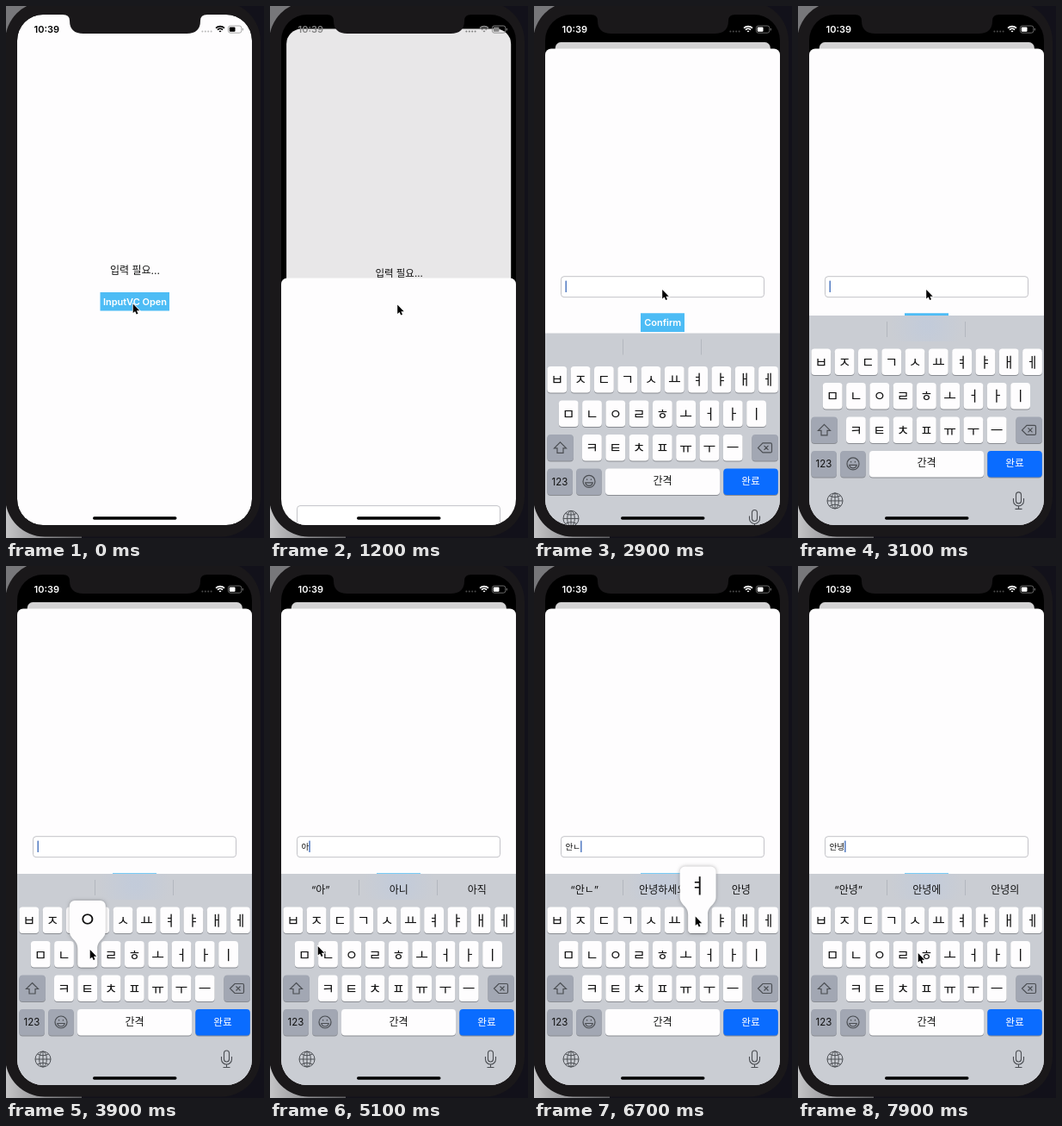
Animation, 300 px wide and 617 px high, one loop 8000 ms. Source, as an HTML page with a canvas:

```html
<!DOCTYPE html>
<html lang="ko">
<head>
<meta charset="utf-8">
<style>
  html, body { margin: 0; width: 300px; height: 617px; overflow: hidden; background: #12111a; }
  canvas { display: block; }
</style>
</head>
<body>
<canvas id="stage" width="300" height="617"></canvas>
<script>
const ctx = document.getElementById('stage').getContext('2d');
const LOOP = 8000, MODAL_START = 1082, KEYBOARD_START = 2627, CARET_START = 2650, HOLD = 140;
const WHITE = '#fefdfe', BLUE = '#4dbcf5', BEZEL = '#1a181a', INK = '#4b4e53';

const rows = [
  { x: 15.4, y: 395.5, keys: 'ㅂㅈㄷㄱㅅㅛㅕㅑㅐㅔ' },
  { x: 28.8, y: 435, keys: 'ㅁㄴㅇㄹㅎㅗㅓㅏㅣ' },
  { x: 56, y: 474.5, keys: 'ㅋㅌㅊㅍㅠㅜㅡ' },
];

const presses = [
  { at: 3830, key: 'ㅇ', text: 'ㅇ', hints: ['“ㅇ”', '아', '안'] },
  { at: 4480, key: 'ㅏ', text: '아', hints: ['“아”', '아니', '아직'] },
  { at: 5260, key: 'ㄴ', text: '안', hints: ['“안”', '안녕', '안녕하세요'] },
  { at: 5520, key: 'ㄴ', text: '안ㄴ', hints: ['“안ㄴ”', '안녕하세요', '안녕'] },
  { at: 6630, key: 'ㅕ', text: '안녀', hints: ['“안녀”', '안녕', '안녕하세요'] },
  { at: 7330, key: 'ㅇ', text: '안녕', hints: ['“안녕”', '안녕에', '안녕의'] },
];

// Pointer stops: time, x, y
const pointer = [
  [0, 147, 345], [180, 147, 345], [300, 147.5, 346], [1950, 147.5, 346], [2300, 148.5, 328.5],
  [3150, 148.5, 328.5], [3750, 97, 444.5], [3980, 97, 444.5], [4420, 231, 446], [4630, 231, 446],
  [5080, 55, 440.5], [5130, 55, 440.5], [5260, 66, 445], [5750, 66, 445], [6500, 187, 406],
  [6800, 187, 406], [7270, 96, 446], [7480, 96, 446], [7850, 139, 448.5], [LOOP, 139, 448.5],
];

const icons = {
  shift: new Path2D('M30.5 483.5L37.5 490.5H34V496H27V490.5H23.5Z'),
  erase: new Path2D('M266 484.5H275Q276.5 484.5 276.5 486V494Q276.5 495.5 275 495.5H266L260.5 490ZM267.5 487.5L272.5 492.5M272.5 487.5L267.5 492.5'),
  smile: new Path2D('M57 529a7 7 0 1 0 14 0a7 7 0 1 0 -14 0M59.8 530.5H68.2Q67.5 534 64 534T59.8 530.5ZM61.6 526V527.6M66.4 526V527.6'),
  globe: new Path2D('M34 572a9 9 0 1 0 18 0a9 9 0 1 0 -18 0M38.7 572a4.3 9 0 1 0 8.6 0a4.3 9 0 1 0 -8.6 0M43 563V581M34 572H52M36.5 566Q43 569.5 49.5 566M36.5 578Q43 574.5 49.5 578'),
  mic: new Path2D('M253.5 565a3 3 0 0 1 6 0V572a3 3 0 0 1 -6 0ZM250.5 569V572a6 6 0 0 0 12 0V569M256.5 578V581.5M252.5 581.5H260.5'),
  arrow: new Path2D('M0 0V10.6L2.4 8.4L4 12L5.8 11.2L4.2 7.7H7.5Z'),
  notch: new Path2D('M66 0V10Q74 10 74 17Q74 32 90 32H210Q226 32 226 17Q226 10 234 10V0Z'),
};

const mix = (a, b, p) => a + (b - a) * p;
const gray = v => `rgb(${v},${v},${v})`;

// Critically damped spring from 0 to 1
function spring(ms) {
  const x = Math.max(0, ms) * 0.0146;
  return 1 - (1 + x) * Math.exp(-x);
}

function box(x, y, w, h, r, fill) {
  ctx.beginPath();
  ctx.roundRect(x, y, w, h, r);
  ctx.fillStyle = fill;
  ctx.fill();
}

function text(str, x, y, size, color = '#111', weight = 400, align = 'center') {
  ctx.font = `${weight} ${size}px Inter, "Noto Sans CJK KR", "Noto Sans CJK", sans-serif`;
  ctx.textAlign = align;
  ctx.fillStyle = color;
  ctx.fillText(str, x, y);
}

function icon(path, width = 1) {
  ctx.strokeStyle = INK;
  ctx.lineWidth = width;
  ctx.stroke(path);
}

function drawBackdrop() {
  ctx.fillStyle = '#12111a';
  ctx.fillRect(0, 0, 300, 617);
  const light = ctx.createLinearGradient(0, 0, 88, 0);
  light.addColorStop(0, '#c4c4c6');
  light.addColorStop(1, '#5c5c60');
  ctx.fillStyle = light;
  ctx.fillRect(0, 550, 88, 67);
  ctx.fillStyle = '#77777a';
  ctx.fillRect(0, 0, 40, 40);
  box(-1, -5, 297, 620.5, 46, BEZEL);
}

function drawHome(t, p) {
  const scale = mix(1, 250 / 273, p);
  ctx.save();
  ctx.translate(mix(13, 24.8, p), mix(10, 42, p));
  ctx.scale(scale, scale);
  ctx.translate(-13, -10);
  box(13, 10, 273, 592, mix(30, 7, p), WHITE);
  text('입력 필요...', 150, 310.5, 12);
  box(109.5, 332, 80.5, 21.5, 0, BLUE);
  ctx.globalAlpha = t > 760 && t < 860 ? 0.35 : 1;
  text('InputVC Open', 150, 347, 11, '#fff', 600);
  ctx.globalAlpha = 1;
  box(13, 10, 273, 592, mix(30, 7, p), `rgba(0,0,0,${0.165 * p})`);
  ctx.restore();
}

function drawModal(t, p, typed) {
  ctx.save();
  ctx.translate(0, 552 * (1 - p));
  box(13, 49.5, 273, 570, 7, WHITE);
  box(31.5, 313.7, 236, 24, 3.5, '#fff');
  ctx.strokeStyle = '#c3c3c8';
  ctx.lineWidth = 1;
  ctx.stroke();
  box(124, 356.3, 51, 21.7, 0, BLUE);
  text('Confirm', 149.7, 371.3, 11, '#fff', 600);
  const value = typed ? typed.text : '';
  text(value, 36.5, 328.8, 9.6, '#111', 400, 'left');
  const since = t - (typed ? typed.at + HOLD : CARET_START);
  if (since >= 0 && since % 1000 < 600) {
    box(36.5 + ctx.measureText(value).width, 318.5, 1.4, 13.5, 0.5, '#4470bd');
  }
  ctx.restore();
}

function drawKey(x, y, w, fill = WHITE) {
  box(x, y + 1, w, 30.5, 4, '#898c92');
  box(x, y, w, 30.5, 4, fill);
}

function drawPopup(x, y, label) {
  const c = x + 11.4, top = y - 47;
  ctx.beginPath();
  ctx.moveTo(c - 15, top);
  ctx.arcTo(c + 21, top, c + 21, top + 20, 6);
  ctx.lineTo(c + 21, top + 35);
  ctx.bezierCurveTo(c + 21, top + 45, c + 11.4, top + 45, c + 11.4, top + 56);
  ctx.arcTo(c + 11.4, y + 30.5, c, y + 30.5, 4);
  ctx.arcTo(c - 11.4, y + 30.5, c - 11.4, y + 10, 4);
  ctx.lineTo(c - 11.4, top + 56);
  ctx.bezierCurveTo(c - 11.4, top + 45, c - 21, top + 45, c - 21, top + 35);
  ctx.arcTo(c - 21, top, c, top, 6);
  ctx.closePath();
  ctx.save();
  ctx.shadowColor = 'rgba(0,0,0,.3)';
  ctx.shadowBlur = 4;
  ctx.fillStyle = WHITE;
  ctx.fill();
  ctx.restore();
  text(label, c, top + 30, 23);
}

function drawKeyboard(t, typed) {
  const offset = 245 * (1 - spring(t - KEYBOARD_START));
  const pressed = presses.find(k => t >= k.at && t < k.at + HOLD);
  let popup;
  ctx.save();
  ctx.translate(0, offset);
  box(13, 357, 273, 260, 0, '#cacdd3');
  if (offset < 21) {
    const tint = ctx.createRadialGradient(150, 368, 5, 150, 368, 42);
    tint.addColorStop(0, 'rgba(190,202,222,.6)');
    tint.addColorStop(1, 'rgba(190,202,222,0)');
    box(108, 357, 84, 30, 0, tint);
  }
  box(103, 364, 1, 18, 0, '#b3b7be');
  box(194, 364, 1, 18, 0, '#b3b7be');
  if (typed) typed.hints.forEach((hint, i) => text(hint, 58.7 + 91 * i, 380, 12));

  for (const row of rows) {
    [...row.keys].forEach((label, i) => {
      const x = row.x + 27.3 * i;
      drawKey(x, row.y, 22.8);
      if (pressed && pressed.key === label) popup = [x, row.y, label];
      else text(label, x + 11.4, row.y + 21.5, 16);
    });
  }
  const dark = '#a2a7b3';
  drawKey(15.4, 474.5, 30.5, dark);
  drawKey(253.4, 474.5, 30.5, dark);
  drawKey(15.4, 514, 29.5, dark);
  drawKey(49.2, 514, 29.5, dark);
  drawKey(83, 514, 133, WHITE);
  drawKey(220.3, 514, 63.5, '#0a6cff');
  text('123', 30, 533.2, 11.5);
  text('간격', 149.5, 532.5, 12);
  text('완료', 252, 532.5, 11.7, '#fff');
  icon(icons.shift, 1.2);
  icon(icons.erase, 1.2);
  icon(icons.smile, 1.2);
  icon(icons.globe);
  icon(icons.mic, 1.1);
  if (popup) drawPopup(...popup);
  ctx.restore();
}

function drawStatus(p) {
  const color = gray(Math.round(255 * p));
  text('10:39', 47.2, 31, 11, color, 600);
  for (let i = 0; i < 4; i++) box(227.4 + 3.4 * i, 28.6, 2, 2, 1, gray(Math.round(mix(185, 75, p))));
  ctx.strokeStyle = color;
  ctx.lineWidth = 1.7;
  for (const r of [1.2, 4.2, 7]) {
    ctx.beginPath();
    ctx.arc(249, 30.6, r, -Math.PI * 0.75, -Math.PI * 0.25);
    ctx.stroke();
  }
  box(259.8, 24.5, 6.7, 5.2, 1, color);
  ctx.beginPath();
  ctx.roundRect(258.4, 23, 15.4, 8.2, 2.4);
  ctx.strokeStyle = gray(Math.round(mix(160, 115, p)));
  ctx.lineWidth = 0.9;
  ctx.stroke();
  box(274.8, 25.8, 1, 2.8, 0.5, gray(Math.round(mix(160, 115, p))));
}

function drawPointer(t) {
  const next = pointer.findIndex(stop => stop[0] > t);
  const [t0, x0, y0] = pointer[next - 1], [t1, x1, y1] = pointer[next];
  const u = (t - t0) / (t1 - t0), p = u * u * (3 - 2 * u);
  ctx.save();
  ctx.translate(mix(x0, x1, p) + 0.7, mix(y0, y1, p) + 0.5);
  ctx.strokeStyle = '#fff';
  ctx.lineWidth = 1.5;
  ctx.stroke(icons.arrow);
  ctx.fillStyle = '#000';
  ctx.fill(icons.arrow);
  ctx.restore();
}

function draw() {
  const t = performance.now() % LOOP;
  const p = spring(t - MODAL_START);
  const typed = presses.filter(k => t >= k.at + HOLD).pop();
  drawBackdrop();
  ctx.save();
  box(13, 10, 273, 592, 30, '#000');
  ctx.clip();
  drawHome(t, p);
  if (p > 0) drawModal(t, p, typed);
  if (t > KEYBOARD_START) drawKeyboard(t, typed);
  drawStatus(p);
  box(101, 592.3, 97.5, 3.4, 1.7, '#000');
  ctx.restore();
  ctx.fillStyle = BEZEL;
  ctx.fill(icons.notch);
  drawPointer(t);
  requestAnimationFrame(draw);
}
draw();
</script>
</body>
</html>
```
